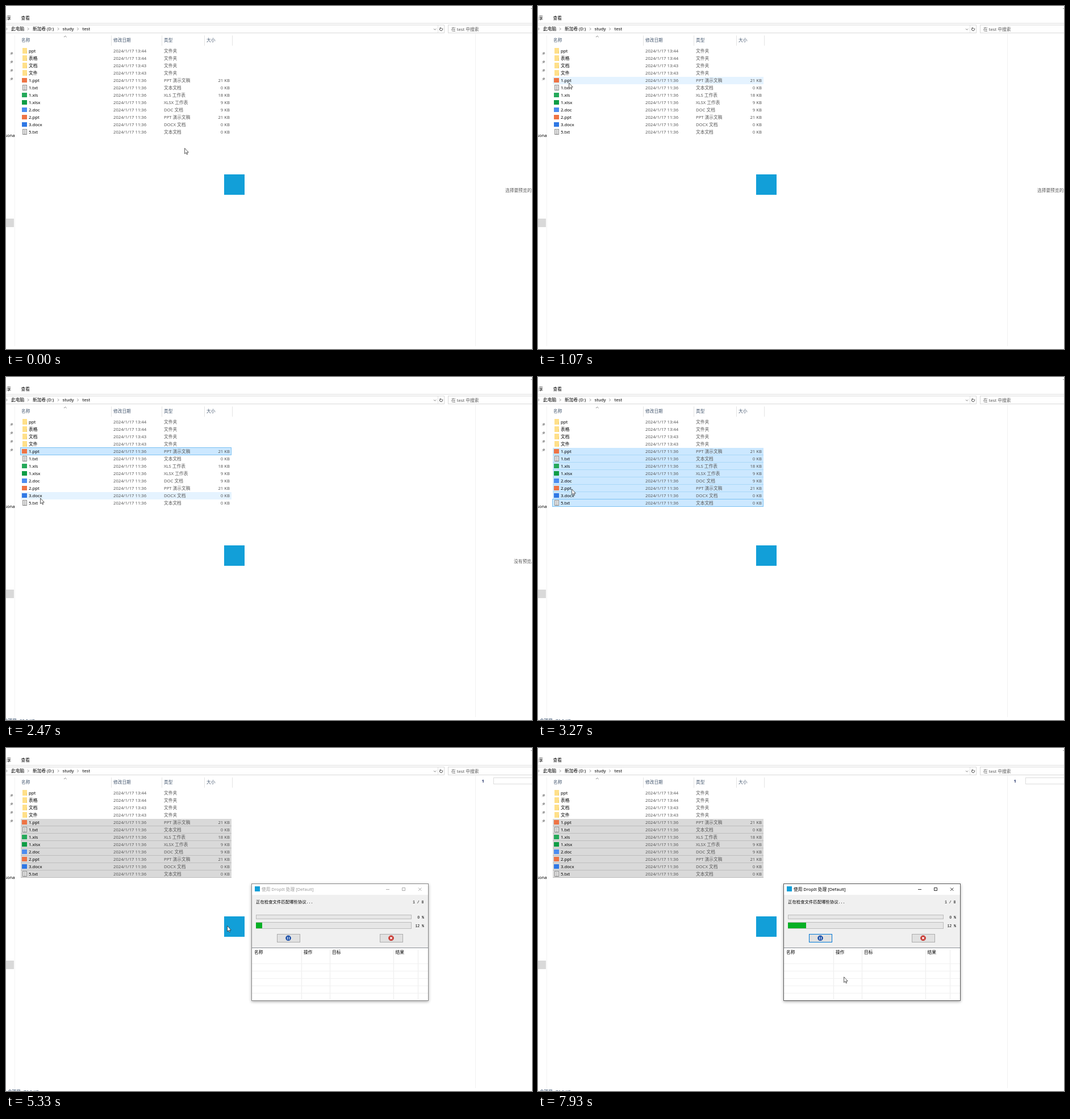
An HTML page that plays this animation: 926x605 px, repeating every 8 s.

```html
<!DOCTYPE html>
<html lang="zh">
<head>
<meta charset="utf-8">
<title>文件整理</title>
<style>
html, body { margin: 0; width: 100%; height: 100%; overflow: hidden; background: #fff; }
svg { display: block; }
rect, line { shape-rendering: crispEdges; }
text { font: 7.7px 'Noto Sans', 'Noto Sans CJK SC', 'Noto Sans CJK', sans-serif; fill: #000; white-space: pre; }
.mono { font: 6.5px 'Liberation Mono', monospace; }
.small { font-size: 7.4px; }
.gray { fill: #585858; }
.head { fill: #43566e; }
.thin { fill: none; stroke: #666; stroke-width: .8; }
</style>
</head>
<body>
<svg id="stage" width="926" height="605" viewBox="0 0 926 605"></svg>
<script>
const ROW_TOP = 73, ROW_H = 13;
const ORANGE = '#ee7445', GREEN = '#25a95a', BLUE = '#2f78e4', LOGO = '#129fd8';

const rect = (x, y, w, h, fill, more = '') =>
  `<rect x="${x}" y="${y}" width="${w}" height="${h}" fill="${fill}" ${more}/>`;
const box = (x, y, w, h, fill, stroke, more = '') =>
  rect(x + .5, y + .5, w - 1, h - 1, fill, `stroke="${stroke}" ${more}`);
const text = (x, y, s, cls = '', more = '') =>
  `<text x="${x}" y="${y + 2.8}" class="${cls}" ${more}>${s}</text>`;
const path = (d, more = 'class="thin"') => `<path d="${d}" ${more}/>`;
const vline = (x, y, h, c) => rect(x, y, 1, h, c);
const hline = (x, y, w, c) => rect(x, y, w, 1, c);
const END = 'text-anchor="end"', MID = 'text-anchor="middle"';

// name, time, type, size, icon colour
const files = [
  ['ppt', '13:44'], ['表格', '13:44'], ['文档', '13:43'], ['文件', '13:43'],
  ['1.ppt', '11:36', 'PPT 演示文稿', 21, ORANGE],
  ['1.txt', '11:36', '文本文档', 0],
  ['1.xls', '11:36', 'XLS 工作表', 18, GREEN],
  ['1.xlsx', '11:36', 'XLSX 工作表', 9, '#0f9d46'],
  ['2.doc', '11:36', 'DOC 文档', 9, '#4c8df0'],
  ['2.ppt', '11:36', 'PPT 演示文稿', 21, ORANGE],
  ['3.docx', '11:36', 'DOCX 文档', 0, BLUE],
  ['5.txt', '11:36', '文本文档', 0]
];

function fileIcon(y, type, color) {
  if (!type) return rect(29, y - 5, 8, 10, '#ffe08a') + rect(36, y, 1, 5, '#f3cf68');
  if (color) return rect(28, y - 4, 9, 8, color);
  let s = box(29, y - 5, 8, 10, '#f4f4f4', '#8c8c8c');
  for (let i = -3; i < 4; i += 2) s += hline(31, y + i, 4, '#a8a8a8');
  return s;
}

function fileRow([name, time, type, size, color], i) {
  const y = 79 + i * ROW_H;
  return rect(26, y - 6, 371, ROW_H, 'none', `id="bg${i}"`) +
    rect(26, y + 6, 371, 1, 'none', `id="edge${i}"`) +
    fileIcon(y, type, color) + text(40, y, name) +
    text(189, y, '2024/1/17 ' + time, 'gray') + text(278, y, type || '文件夹', 'gray') +
    (type ? text(394, y, size + ' KB', 'gray', END) : '');
}

function explorer() {
  const chevron = x => path(`M${x} 38.4l2 2.1-2 2.1`);
  const pin = y => `<g transform="translate(9.5 ${y}) rotate(45) scale(.8)">` +
    path('M-1.6-3h3.2v3h-3.2zM-2.8 .6h5.6M0 .6v3.4', 'fill="#aaa" stroke="#777" stroke-width=".8"') + '</g>';
  return rect(924, 4, 2, 1, '#999') +
    text(9, 21, '共享', '', END) + text(26.5, 21, '查看') +
    hline(0, 30, 926, '#dcdcdc') +
    box(-2, 33, 774, 15, '#fff', '#d9d9d9') + vline(760, 34, 13, '#e2e2e2') +
    box(778, 33, 150, 15, '#fff', '#d9d9d9') +
    [0, 38, 91, 125.5].map(chevron).join('') +
    text(9, 40, '此电脑') + text(47, 40, '新加卷 (D:)') + text(99.5, 40, 'study') + text(134.5, 40, 'test') +
    path('M753 40l2.2 2.2 2.2-2.2') +
    path('M767.6 38.9a2.6 2.6 0 1 1-3.4.2M763.6 38.6h2.2v2', 'fill="none" stroke="#333" stroke-width=".9"') +
    text(784, 41, '在 test 中搜索', 'gray') +
    vline(15, 52, 548, '#f3f3f3') + vline(826, 49, 551, '#f1f1f1') +
    [185, 274, 349, 398].map(x => vline(x, 52, 18, '#e3e3e3')).join('') +
    path('M102 55l2.3-2.2 2.3 2.2') +
    text(27, 60, '名称', 'head') + text(189, 60, '修改日期', 'head') +
    text(278, 60, '类型', 'head') + text(353, 60, '大小', 'head') +
    [84, 99, 114, 129].map(pin).join('') +
    text(15.5, 228, 'Persona', '', END) + rect(0, 375, 14, 15, '#d9d9d9') +
    files.map(fileRow).join('') +
    box(25, 0, 372, ROW_H + 1, 'none', '#7cc1f2', 'id="focus"');
}

function preview() {
  return text(879, 325, '选择要预览的文件。', 'gray', 'id="hint"') +
    text(894, 325, '没有预览。', 'gray', 'id="none"') +
    '<g id="sheet">' + text(837.5, 58, '1', '', 'style="fill:#1f2f66;font-weight:600"') +
    box(858, 52, 70, 12, '#fff', '#dcdcdc') + '</g>' +
    text(19, 606, '选中 1 个项目', '', END + ' id="one" style="fill:#1e395b"') +
    text(24, 606, '20.5 KB', '', 'id="oneSize" style="fill:#1e395b"') +
    text(26, 606, '选中 8 个项目', '', END + ' id="all" style="fill:#1e395b"') +
    text(31, 606, '76.0 KB', '', 'id="allSize" style="fill:#1e395b"');
}

const ghost = () => '<g id="ghost">' +
  rect(0, 0, 65, 65, 'url(#pale)', 'filter="url(#soft)"') +
  rect(27, 26, 10, 11, '#0078d7') + text(32, 31.5, '8', '', MID + ' style="fill:#fff"') + '</g>';

function progressWindow() {
  let s = '<g id="win">' + rect(432, 239, 312, 207, '#fff', 'filter="url(#shade)"') +
    box(432, 239, 312, 207, '#fff', '#8a8a8a', 'id="frame"') +
    rect(433, 259, 310, 93, '#f0f0f0') + rect(438, 244, 9, 9, LOGO) +
    text(450, 249, '使用 DropIt 处理 [Default]', '', 'id="title"') +
    path('M669 249.5h6M697.5 246.5h5v5h-5zM726 246.5l5.4 5.4M731.4 246.5l-5.4 5.4', 'id="controls" fill="none" stroke-width=".8"') +
    text(440, 271, '正在检查文件匹配哪些协议<tspan class="mono">...</tspan>', 'small') +
    text(735.5, 271, '1 / 8', 'mono', END) +
    text(736, 298, '0 %', 'mono', END) + text(736, 313, '12 %', 'mono', END) +
    box(440, 294, 274, 8, '#e6e6e6', '#bcbcbc') + box(440, 307, 274, 12, '#e6e6e6', '#bcbcbc') +
    rect(440, 308, 0, 10, '#06b025', 'id="bar"') +
    '<g clip-path="url(#barClip)">' + rect(0, 308, 30, 10, 'url(#shine)', 'id="glow"') + '</g>' +
    box(477, 328, 41, 15, '#e1e1e1', '#adadad', 'id="pause"') +
    box(658, 328, 41, 15, '#e1e1e1', '#adadad') +
    '<circle cx="497" cy="335.3" r="4.8" fill="#1c4fa8"/>' +
    rect(495, 333, 1, 5, '#fff') + rect(498, 333, 1, 5, '#fff') +
    '<circle cx="678" cy="335.3" r="4.8" fill="#c5312a"/>' +
    path('M676 333.3l4 4M680 333.3l-4 4', 'stroke="#fff" stroke-width="1.4"') +
    hline(433, 352, 310, '#8a8f96');
  for (const x of [520, 570, 682, 725]) s += vline(x, 355, 89, '#ececec');
  for (let y = 380; y < 440; y += 13) s += hline(433, y, 310, '#f1f1f1');
  [[437, '名称'], [524, '操作'], [574, '目标'], [685.5, '结果']].forEach(([x, n]) => s += text(x, 360, n));
  return s + '</g>';
}

function dialog() {
  const button = (x, label, id = '') =>
    box(x, 393, 54, 17, '#e1e1e1', '#adadad', id) + text(x + 27, 401.5, label, 'small', MID);
  return '<g id="dialog">' + rect(483, 294, 208, 124, '#fff', 'filter="url(#shade)"') +
    box(483, 294, 208, 124, '#fff', '#555') + rect(484, 386, 206, 31, '#f0f0f0') +
    text(485.5, 302.5, '需要关联协议', 'small') +
    path('M678 300l5.6 5.6M683.6 300l-5.6 5.6', 'stroke="#000" stroke-width=".9"') +
    text(490.5, 333, '找不到关联的协议:', 'small') +
    text(490.5, 343, 'D:\\study\\test\\2.ppt', 'small') +
    text(490.5, 363, '是否为其创建一个关联的协议?', 'small') +
    button(504, '是(Y)', 'id="yes"') + button(563, '否(N)') + button(624, '取消') + '</g>';
}

document.getElementById('stage').innerHTML = `<defs>
  <linearGradient id="pale" x2="0" y2="1"><stop stop-color="#f3fafb"/><stop offset="1" stop-color="#dff0fb"/></linearGradient>
  <linearGradient id="shine"><stop stop-color="#fff" stop-opacity="0"/><stop offset=".5" stop-color="#fff" stop-opacity=".25"/><stop offset="1" stop-color="#fff" stop-opacity="0"/></linearGradient>
  <filter id="soft"><feDropShadow dx="1" dy="1" stdDeviation="1" flood-opacity=".4"/></filter>
  <filter id="shade"><feDropShadow dx="0" dy="1.5" stdDeviation="2.5" flood-opacity=".35"/></filter>
  <clipPath id="barClip"><rect x="440" y="308" width="32" height="10"/></clipPath></defs>` +
  explorer() + preview() + ghost() + rect(384, 297, 36, 36, LOGO) + progressWindow() + dialog() +
  path('M-.4-.2v9.8l2.2-2 1.5 3.3 1.4-.6-1.4-3.2h3z',
    'id="cursor" fill="#fff" stroke="#222" stroke-width=".75" stroke-linejoin="round"');

const el = {};
document.querySelectorAll('#stage [id]').forEach(e => el[e.id] = e);
const set = (id, name, value) => el[id].setAttribute(name, value);
const show = (id, on) => set(id, 'visibility', on ? 'visible' : 'hidden');

// time, x, y of the pointer
const track = [
  [0, 315, 251], [70, 312, 249], [400, 205, 188], [600, 92, 126], [700, 66, 121], [870, 57, 154],
  [930, 56, 150], [1000, 55, 141], [1067, 55, 136], [1330, 55, 136], [1730, 60, 190], [2130, 64, 253],
  [2270, 63, 249], [2467, 61, 214], [2600, 55, 219], [2870, 55, 219], [2930, 55, 221], [3070, 55, 221],
  [3330, 62, 190], [3530, 66, 184], [3870, 183, 212], [4133, 382, 316], [4330, 389, 325], [4730, 390, 314],
  [5334, 390, 314], [5670, 495, 385], [5870, 522, 400], [6130, 528, 403], [6530, 528, 403],
  [6930, 539, 403], [7870, 539, 403], [7930, 539, 404]
];

function pointer(t) {
  const i = track.findIndex(k => k[0] > t);
  if (i < 0) return track[track.length - 1].slice(1);
  const [t0, x0, y0] = track[i - 1], [t1, x1, y1] = track[i];
  const f = (t - t0) / (t1 - t0);
  return [Math.round(x0 + (x1 - x0) * f), Math.round(y0 + (y1 - y0) * f)];
}

function render(time) {
  const t = Math.floor((time + 4) * .015) / .015;
  const from = ms => t + 5 >= ms;
  const during = (a, b) => from(a) && !from(b);
  const [x, y] = pointer(t);
  const dropped = from(4870), many = from(3070), picked = from(1330), active = from(7600);
  const dragging = during(3600, 4870);
  const hover = x < 397 && !dragging && !dropped ? Math.floor((y - ROW_TOP) / ROW_H) : -1;

  files.forEach((_, i) => {
    const selected = many ? i > 3 : picked && i === 4;
    const fill = selected ? (dropped ? '#d9d9d9' : '#cce8ff') : i === hover ? '#e5f3ff' : 'none';
    set('bg' + i, 'fill', fill);
    set('edge' + i, 'fill', selected && many ? (dropped ? '#bdbdbd' : '#a9d8f8') : 'none');
  });
  show('focus', picked && !dropped);
  set('focus', 'y', ROW_TOP - .5 + ROW_H * (from(3530) ? 8 : many ? 11 : 4));

  show('hint', !from(1600));
  show('none', during(1600, 3200));
  show('sheet', from(3930));
  for (const id of ['one', 'oneSize']) show(id, picked && !many);
  for (const id of ['all', 'allSize']) show(id, many);

  show('ghost', dragging);
  set('ghost', 'transform', `translate(${x - 33} ${y - 58})`);

  show('win', from(5000));
  set('bar', 'width', Math.max(0, Math.min(32, (t - 5200) * .085)));
  set('glow', 'x', 410 + (t - 5730) * .07);
  show('glow', during(5730, 6930));
  set('frame', 'stroke', active ? '#5c5c5c' : '#8a8a8a');
  set('title', 'style', `fill:${active ? '#000' : '#999'}`);
  set('controls', 'stroke', active ? '#000' : '#999');
  set('pause', 'stroke', active ? '#0078d7' : '#adadad');
  set('pause', 'stroke-width', active ? 1.6 : 1);

  const over = x >= 504 && x < 558 && y >= 393 && y < 410;
  show('dialog', during(5470, 7600));
  set('yes', 'fill', over ? '#e5f1fb' : '#e1e1e1');
  set('yes', 'stroke', '#0078d7');
  set('cursor', 'transform', `translate(${x} ${y})`);
}

const start = performance.now();
function tick() {
  render((performance.now() - start) % 8000);
  requestAnimationFrame(tick);
}
tick();
</script>
</body>
</html>
```
